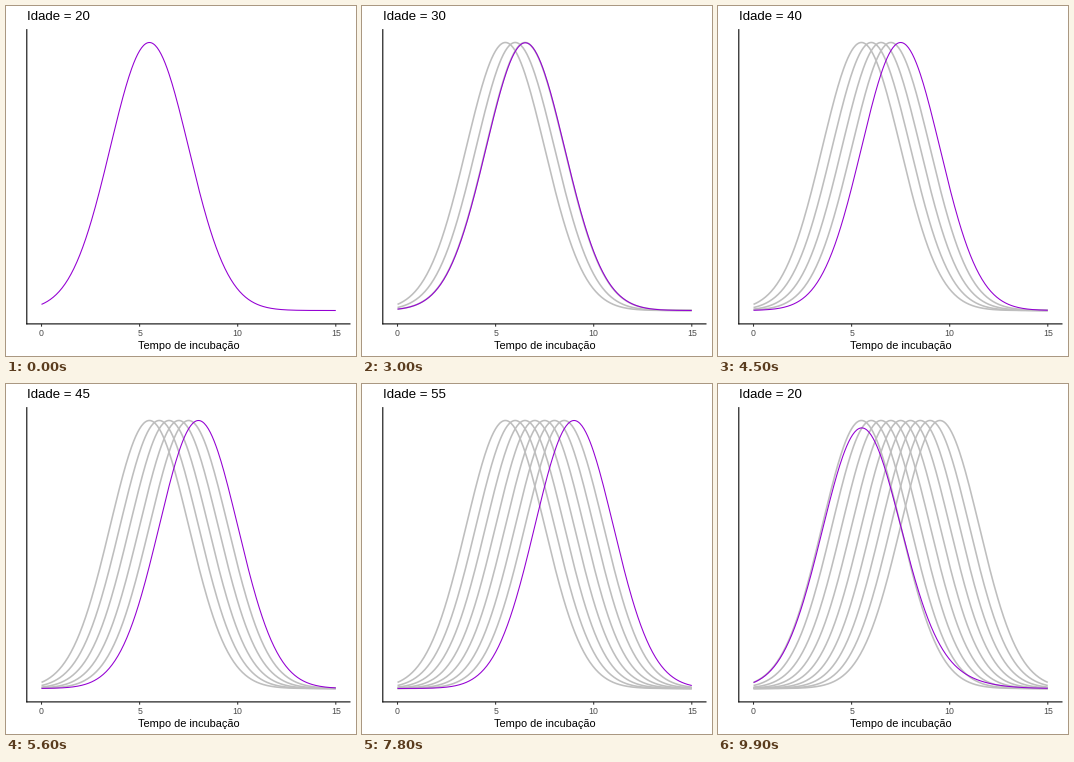
A matplotlib script that plays this animation: 350 by 350 pixels, repeating every 10 s.

```python
import numpy as np
import matplotlib.pyplot as plt
from matplotlib.animation import FuncAnimation

SIZE, DPI = 350, 100
PT = 72 / DPI  # points per pixel
FRAMES, INTERVAL = 100, 100

LEFT, RIGHT, TOP, BOTTOM = 20.8, 344.5, 23.1, 317.9
UNIT = (RIGHT - LEFT) / 16.5
BASE, HEIGHT = 304.5, 268

AGES = range(20, 61, 5)
STARTS = [6, 18, 30, 41, 52, 63, 74, 85, 96]
STEPS = [6, 6] + [5] * 7

plt.rcParams["font.family"] = "Liberation Sans"


def px(x):
    return LEFT + (x + 0.75) * UNIT


def py(density):
    return BASE - HEIGHT * density


def bell(mean, sd=2):
    return np.exp(-((days - mean) / sd) ** 2 / 2)


def ease(t):
    """Cubic in-out."""
    return 4 * t**3 if t < 0.5 else 1 - 4 * (1 - t) ** 3


def line(xs, ys, color, width):
    return ax.plot(xs, ys, color=color, lw=width * PT, snap=False,
                   solid_capstyle="butt", solid_joinstyle="round")[0]


def label(x, y, text, size, color="black", ha="center"):
    return ax.text(x, y, text, size=size * PT, color=color, ha=ha,
                   va="baseline")


fig = plt.figure(figsize=(SIZE / DPI, SIZE / DPI), dpi=DPI, facecolor="white")
ax = fig.add_axes([0, 0, 1, 1])
ax.set(xlim=(0, SIZE), ylim=(SIZE, 0))
ax.axis("off")

days = np.linspace(0, 15, 301)
curves = [bell(3.5 + age / 10) for age in AGES]

shadows = [line(px(days), py(c), "#bebebe", 1.6) for c in curves]
current = line(px(days), py(curves[0]), "#9400d3", 1.07)

line([LEFT, LEFT], [TOP, BOTTOM + 0.5], "black", 1.07)
line([LEFT - 0.5, RIGHT], [BOTTOM, BOTTOM], "black", 1.07)
for tick in (0, 5, 10, 15):
    line([px(tick)] * 2, [BOTTOM, BOTTOM + 2.75], "#333333", 1.07)
    label(px(tick), 330, str(tick), 8.8, "#4d4d4d")
label((LEFT + RIGHT) / 2, 343, "Tempo de incubação", 11)
title = label(LEFT, 14, "", 13.2, ha="left")


def update(frame):
    state, t = 0, 0
    for i, (start, steps) in enumerate(zip(STARTS, STEPS)):
        if frame >= start:
            state, t = i, min((frame - start + 1) / steps, 1)
        shadows[i].set_visible(frame >= start)
    following = (state + 1) % len(curves)
    mix = ease(t)
    current.set_ydata(py((1 - mix) * curves[state] + mix * curves[following]))
    title.set_text(f"Idade = {AGES[following if t >= 0.5 else state]}")
    return [*shadows, current, title]


anim = FuncAnimation(fig, update, frames=FRAMES, interval=INTERVAL,
                     repeat=True, repeat_delay=0)
plt.show()
```
